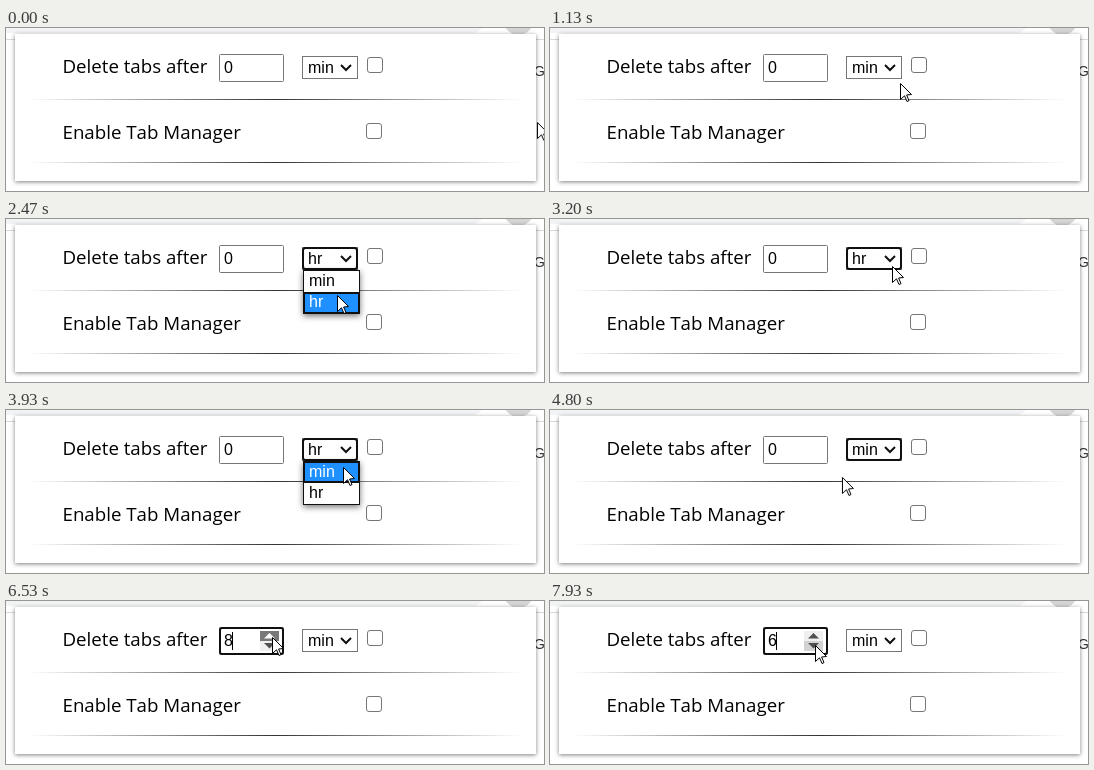
These frames come from a looping animation (538x163 px, 8 s). An HTML page:

```html
<!DOCTYPE html>
<html lang="en">
<head>
<meta charset="utf-8">
<title>Tab settings</title>
<style>
html, body { margin: 0; width: 100%; height: 100%; overflow: hidden; background: #fff; }
svg { display: block; width: 538px; height: 163px; }
text { font: 16px "Liberation Sans", Arial, sans-serif; fill: #000; }
.label { font: 18.7px "Open Sans", sans-serif; font-kerning: none; }
.card { fill: #fff; filter: drop-shadow(0 1px 2px rgba(0,0,0,.5)); }
.field { fill: #fff; stroke: #767676; }
.ring { fill: none; stroke: #101010; stroke-width: 2; }
.popup { filter: drop-shadow(0 2px 3px rgba(0,0,0,.55)); }
.option { fill: #1e90ff; stroke: #101010; stroke-width: 2; }

.arrow { fill: #505050; }
.half { fill: #efefef; }
.hover .half { fill: #d2d2d2; }
.pressed .half { fill: #787878; }
.pressed .arrow { fill: #fff; }

.anim { animation: 8s step-end infinite; }
.cursor { animation: move 8s linear infinite; }
.unit-min { animation-name: unit-min; }
.unit-hr { animation-name: unit-hr; }
.select-ring { animation-name: select-focus; }
.input-ring { animation-name: input-focus; }
.spinner { animation-name: spinner; }
.popup { animation-name: popup; }
.pick-min { animation-name: pick-min; }
.pick-hr { animation-name: pick-hr; }
.text-min { animation-name: text-min; }
.text-hr { animation-name: text-hr; }

@keyframes unit-min { 0%, 55.875% { opacity: 1 } 30.875% { opacity: 0 } }
@keyframes unit-hr { 0%, 55.875% { opacity: 0 } 30.875% { opacity: 1 } }
@keyframes select-focus { 0%, 68.375% { opacity: 0 } 17.5% { opacity: 1 } }
@keyframes input-focus { 0% { opacity: 0 } 68.375%, 100% { opacity: 1 } }
@keyframes spinner { 0% { opacity: 0 } 63.3%, 100% { opacity: 1 } }
@keyframes popup { 0%, 31.625%, 55.875% { opacity: 0 } 20%, 46.625% { opacity: 1 } }
@keyframes pick-min { 0%, 49.125% { opacity: 1 } 27.5% { opacity: 0 } }
@keyframes pick-hr { 0%, 49.125% { opacity: 0 } 27.5% { opacity: 1 } }
@keyframes text-min { 0%, 49.125% { fill: #fff } 27.5% { fill: #000 } }
@keyframes text-hr { 0%, 49.125% { fill: #000 } 27.5% { fill: #fff } }
@keyframes move {
  0% { transform: translate(531px, 94px) }
  3.75% { transform: translate(500px, 101px) }
  10.875%, 11.625% { transform: translate(375px, 79px) }
  14.125% { transform: translate(350px, 55px) }
  17.5%, 20% { transform: translate(342px, 42px) }
  25% { transform: translate(335px, 62px) }
  28.375%, 34.125% { transform: translate(331px, 76px) }
  40% { transform: translate(342px, 47px) }
  44.125%, 46.625% { transform: translate(341px, 42px) }
  49.125%, 50% { transform: translate(337px, 57px) }
  51.625%, 55.875% { transform: translate(336px, 55px) }
  60% { transform: translate(292px, 67px) }
  64.125%, 82.5% { transform: translate(266px, 36px) }
  86%, 88.375% { transform: translate(266px, 50px) }
  93%, 100% { transform: translate(265px, 44px) }
}
</style>
</head>
<body>
<svg viewBox="0 0 538 163">
  <defs>
    <linearGradient id="fade">
      <stop offset="0" stop-color="#333" stop-opacity="0"/>
      <stop offset=".5" stop-color="#333"/>
      <stop offset="1" stop-color="#333" stop-opacity="0"/>
    </linearGradient>
  </defs>

  <rect x="-40" y="-20" width="518" height="25" rx="12" fill="#f1f3f4"/>
  <circle cx="512.5" cy="-8" r="15" fill="#d5d5d5"/>
  <path d="M0 11.5H538" stroke="#d8d8d8"/>
  <text x="528" y="48" style="font-size:14px;fill:#333">G</text>
  <rect class="card" x="9" y="6" width="521" height="147"/>
  <rect x="22" y="71" width="494" height="1" fill="url(#fade)"/>
  <rect x="22" y="134" width="494" height="1" fill="url(#fade)"/>

  <text class="label" x="56.5" y="45">Delete tabs after</text>
  <text class="label" x="56.5" y="111">Enable Tab Manager</text>
  <rect class="field" x="361.5" y="29.5" width="15" height="15" rx="2.5"/>
  <rect class="field" x="360.5" y="95.5" width="15" height="15" rx="2.5"/>

  <rect class="field" x="213.5" y="26.5" width="64" height="27" rx="1"/>
  <text id="value" x="218" y="45">0</text>
  <g class="anim input-ring">
    <rect class="ring" x="214" y="27" width="63" height="26" rx="2"/>
    <rect x="226" y="31" width="1" height="18"/>
  </g>
  <g class="anim spinner">
    <g id="up"><rect class="half" x="254" y="30" width="19" height="10"/><path class="arrow" d="M258 37.5L263.5 32 269 37.5Z"/></g>
    <g id="down"><rect class="half" x="254" y="40" width="19" height="10"/><path class="arrow" d="M258 42L263.5 47.5 269 42Z"/></g>
  </g>

  <rect class="field" x="296.5" y="28.5" width="55" height="22"/>
  <text class="anim unit-min" x="302" y="45">min</text>
  <text class="anim unit-hr" x="302" y="45">hr</text>
  <path d="M335 37L340 42 345 37" fill="none" stroke="#101010" stroke-width="2"/>
  <rect class="anim select-ring ring" x="297" y="29" width="54" height="21" rx="2.5"/>

  <g class="anim popup">
    <rect x="297.5" y="51.5" width="56" height="43" fill="#fff" stroke="#101010"/>
    <rect class="anim pick-min option" x="298" y="52" width="55" height="20"/>
    <rect class="anim pick-hr option" x="298" y="74" width="55" height="20"/>
    <text class="anim text-min" x="303" y="67">min</text>
    <text class="anim text-hr" x="303" y="88">hr</text>
  </g>

  <path class="cursor" d="M.5 .5V16.5L4.5 12.8 7 18.5 9 17.6 6.6 12 11.5 11.5Z" fill="#fff" stroke="#000"/>
</svg>
<script>
const LOOP = 8000, PRESS = 66, TURN = 6700;
const upClicks = [5470, 5600, 5730, 5870, 6000, 6130, 6330, 6480, 6600];
const downClicks = [7200, 7670, 7800];
const $ = id => document.getElementById(id);
const clock = document.querySelector('.cursor').getAnimations()[0];

const count = (clicks, t) => clicks.filter(c => c <= t).length;
const isPressed = (clicks, t) => clicks.some(c => t >= c && t < c + PRESS);

function setButton(id, clicks, hover, t) {
  $(id).classList.toggle('hover', hover);
  $(id).classList.toggle('pressed', isPressed(clicks, t));
}

function draw() {
  const t = (clock.currentTime || 0) % LOOP;
  $('value').textContent = count(upClicks, t) - count(downClicks, t);
  setButton('up', upClicks, t < TURN, t);
  setButton('down', downClicks, t >= TURN, t);
  requestAnimationFrame(draw);
}
draw();
</script>
</body>
</html>
```
